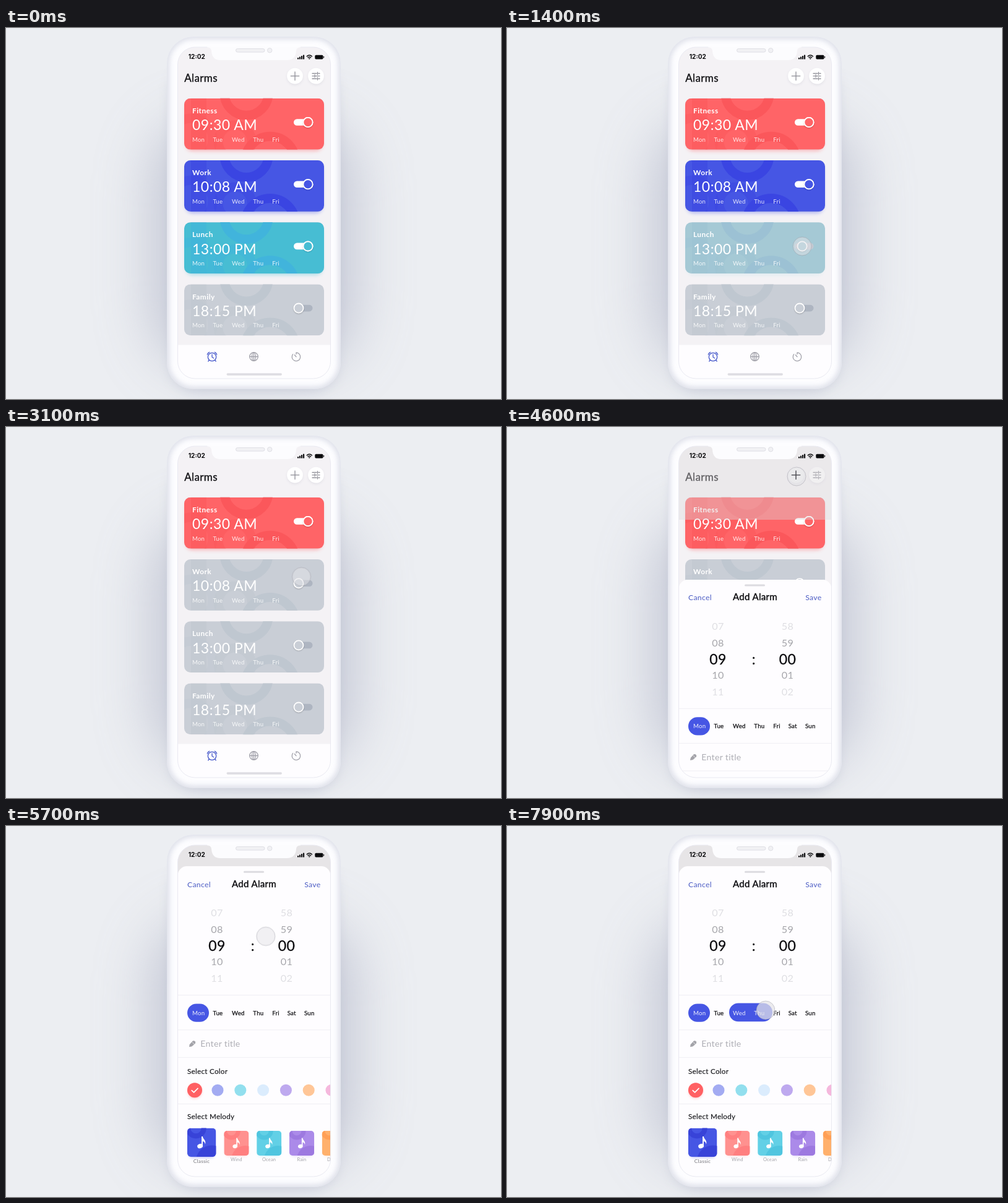
Animation of 800 by 600 pixels, one loop 8000 ms. Source, as an HTML page:

```html
<!DOCTYPE html>
<html lang="en">
<head>
<meta charset="utf-8">
<title>Alarms</title>
<style>
  html, body { margin: 0; width: 100%; height: 100%; overflow: hidden; background: #eceef2; }
  svg { display: block; }
  text { font-family: Lato, "Open Sans", sans-serif; letter-spacing: .022em; white-space: pre; }
  .clock { font-family: Inter, sans-serif; font-weight: 700; letter-spacing: 0; }

  /* --on: 1 = alarm lit, 0 = alarm off */
  @property --on { syntax: "<number>"; inherits: true; initial-value: 1; }
  .lit { opacity: var(--on); }
  .knob { transform: translateX(calc((var(--on) - 1) * 15px)); }
  .family { --on: 0; }

  .lunch, .work, .sheet, .dim, .cursor, .disc, .plus, .range, .rangeBox {
    animation: 8s linear infinite;
  }
  .lunch { animation-name: lunch; }
  .work { animation-name: work; }
  .sheet { animation-name: sheet; }
  .dim { animation-name: dim; }
  .cursor { animation-name: cursor; }
  .disc { animation-name: press; }
  .plus { animation-name: plus; }
  .range { animation-name: range; }
  .rangeBox { animation-name: stretch; }

  @keyframes lunch {
    0%, 13.125% { --on: 1; animation-timing-function: ease-in-out; }
    20%, 100% { --on: 0; }
  }
  @keyframes work {
    0%, 29.375% { --on: 1; animation-timing-function: ease-in-out; }
    35.625%, 100% { --on: 0; }
  }
  @keyframes sheet {
    0%, 55.25% { transform: translateY(508px); }
    56.25% { transform: translateY(455px); }
    57.5% { transform: translateY(183px); }
    58.75% { transform: translateY(62px); }
    60% { transform: translateY(14px); }
    61.25% { transform: translateY(-3px); }
    62.5% { transform: translateY(-6px); animation-timing-function: ease-in-out; }
    67.5%, 100% { transform: none; }
  }
  @keyframes dim {
    0%, 56.25% { opacity: 0; }
    57.5% { opacity: .4; }
    60%, 100% { opacity: .55; }
  }
  @keyframes cursor {
    0%, 6% { opacity: 0; transform: translate(488px, 353px); }
    10%, 13.125% { opacity: 1; transform: translate(488px, 353px); animation-timing-function: ease-in-out; }
    20%, 21.5% { transform: translate(473px, 353px); animation-timing-function: ease-in-out; }
    27.5%, 29.375% { transform: translate(490px, 251px); animation-timing-function: ease-in-out; }
    35.625%, 37% { transform: translate(478px, 251px); animation-timing-function: ease-in-out; }
    48%, 65% { transform: translate(468px, 80px); animation-timing-function: ease-in; }
    71.25% { transform: translate(420px, 178px); animation-timing-function: ease-out; }
    78%, 90% { transform: translate(376px, 298px); animation-timing-function: cubic-bezier(.4, 0, .8, .8); }
    98.75%, 100% { opacity: 1; transform: translate(418px, 298px); }
  }
  @keyframes press {
    0%, 80% { fill-opacity: .5; }
    83%, 100% { fill-opacity: .72; }
  }
  @keyframes plus {
    0%, 51% { opacity: 0; }
    53%, 59.2% { opacity: 1; }
    59.3%, 100% { opacity: 0; }
  }
  @keyframes range {
    0%, 81.5% { opacity: 0; }
    84%, 100% { opacity: 1; }
  }
  @keyframes stretch {
    0%, 90% { width: 34px; animation-timing-function: cubic-bezier(.4, 0, .8, .8); }
    98.75%, 100% { width: 70px; }
  }
</style>
</head>
<body>
<svg id="stage" width="800" height="600" viewBox="0 0 800 600"></svg>
<script>
const BLUE = '#4656e4', GRAY = '#c9ced6', GRAY_RING = '#bfc7d0';

const text = (x, y, size, str, attrs = '') =>
  `<text x="${x}" y="${y}" font-size="${size}" ${attrs}>${str}</text>`;
const ink = (color, weight = .35) => `fill="${color}" stroke="${color}" stroke-width="${weight}"`;
const rect = (x, y, w, h, r, attrs = '') =>
  `<rect x="${x}" y="${y}" width="${w}" height="${h}" rx="${r}" ${attrs}/>`;
const circle = (x, y, r, attrs = '') => `<circle cx="${x}" cy="${y}" r="${r}" ${attrs}/>`;
const path = (d, attrs = '') => `<path d="${d}" ${attrs}/>`;
const line = color => `fill="none" stroke="${color}" stroke-width="1.3" stroke-linecap="round" stroke-linejoin="round"`;
const at = (x, y, body, attrs = '') => `<g transform="translate(${x} ${y})" ${attrs}>${body}</g>`;

// Alarm cards
const face = (base, ring, track) => `
  <g clip-path="url(#card)">
    ${rect(0, 0, 226, 83, 0, `fill="${base}"`)}
    <g fill="none" stroke="${ring}" stroke-width="15">
      ${rect(11, 0, 25, 83, 0, `fill="${ring}" stroke="none" opacity=".5"`)}
      ${circle(12, 66, 34, 'opacity=".45"')}
      ${circle(82, 70, 27, 'opacity=".5"')}
      ${circle(100.5, -8, 35.5)}
      ${circle(139, 102, 40.5)}
    </g>
  </g>
  ${rect(177, 33.4, 30.5, 10.6, 5.3, `fill="${track}"`)}`;

const DAYS = [['Mon', 301], ['Tue', 334.5], ['Wed', 365], ['Thu', 399.3], ['Fri', 430.3], ['Sat', 454.7], ['Sun', 482]];

const card = (name, row, title, time, base, ring) => at(288, 113.8 + 100.2 * row, `
  <g class="lit">${rect(3, 6, 220, 79, 10, `fill="${base}" opacity=".45" filter="url(#soft3)"`)}</g>
  ${face(GRAY, GRAY_RING, '#aeb5c1')}
  <g class="lit">${face(base, ring, '#fff')}</g>
  <g class="knob" stroke="#fff" stroke-width="1.8">
    ${circle(200, 39.8, 8.3, 'fill="#000" stroke="none" opacity=".22" filter="url(#soft1)"')}
    ${circle(200, 38.7, 7.6, `fill="${GRAY}"`)}
    ${circle(200, 38.7, 7.6, `class="lit" fill="${base}"`)}
  </g>
  <g fill="#fff">
    ${text(13, 24.3, 11.8, title, 'font-weight="700" style="letter-spacing:.04em"')}
    ${text(13, 51.4, 23, time)}
    <g opacity=".85">${DAYS.slice(0, 5).map(([d, x]) => text(x - 288, 70, 9.6, d)).join('')}</g>
  </g>`, `class="${name}"`).replace(/^<g (transform="[^"]*") class="([^"]*)">/, '<g $1><g class="$2">') + '</g>';

const plusIcon = color => path('M460.3 77.7H473.7M467 71V84.4', line(color));
const slidersIcon = path('M495 73.5H502M505 73.5H507M503.5 71.5V75.5M495 77.7H497.5M500 77.7H507M499 75.7V79.7M495 82H502M505 82H507M503.5 80V84', line('#92929a'));

const button = x => circle(x, 79.5, 12.5, 'fill="#777a90" opacity=".16" filter="url(#soft2)"') + circle(x, 77.7, 12.9, 'fill="#fff"');

const nav = `
  ${rect(277, 512.5, 248, 56, 0, 'fill="#fefdff"')}
  <g ${line('#4355c9')}>
    ${circle(333, 532, 6.7)}
    ${path('M333 528V532.3L335.8 534M325.3 528.2Q326 525.5 328.6 524.3M340.7 528.2Q340 525.5 337.4 524.3M328.3 537.3L326.8 539M337.7 537.3L339.2 539')}
  </g>
  <g ${line('#a3a3ab')}>
    ${circle(400.5, 531.5, 6.8)}
    <ellipse cx="400.5" cy="531.5" rx="3" ry="6.8"/>
    ${path('M394 531.5H407M400.5 525V538')}
    ${path('M469 527.5V525A6.8 6.8 0 1 1 463.6 527.6M466.4 528.7L469 531.7')}
  </g>
  ${rect(356.5, 558.3, 89.5, 3.6, 1.8, 'fill="#dfdee3"')}`;

// Add-alarm sheet
const wheel = (x, rows) => rows.map((n, i) => {
  const far = Math.abs(i - 2), y = [145.8, 172.8, 202.2, 225.2, 252.2][i];
  return text(x, y, far ? 16.2 : 23, n, `text-anchor="middle" ${far ? `fill="${far > 1 ? '#dfdfe3' : '#a6a6ab'}"` : ink('#0b0b0e', .3)}`);
}).join('');

const SWATCHES = ['#a3abf2', '#92dfee', '#dbecfd', '#bea9ef', '#ffc697', '#f5b8dd'];

const tile = (x, y, scale, base, ring) => at(x, y, `<g transform="scale(${scale})">
  ${rect(2, 5, 36, 36, 5, `fill="${base}" opacity=".35" filter="url(#soft2)"`)}
  <g clip-path="url(#tile)">
    ${rect(0, 0, 40, 40, 0, `fill="${base}"`)}
    ${circle(12, 0, 11, `fill="none" stroke="${ring}" stroke-width="7"`)}
    ${circle(34, 46, 22, `fill="${ring}"`)}
  </g>
  <g fill="#fff">
    <ellipse cx="17.8" cy="25" rx="3.9" ry="3.1" transform="rotate(-20 17.8 25)"/>
    ${path('M19.9 25V11.5H21.4C21.8 15.6 26.6 16.4 25 22.6C24.6 19.6 23 18.6 21.5 18.4V25Z')}
  </g></g>`);

const MELODIES = [['Wind', '#ff918f', '#ff7f80'], ['Ocean', '#62d0e6', '#4fc5df'], ['Rain', '#ab8ae9', '#9d79e0'], ['Desert', '#ffb06c', '#ff9f55']];

const week = attrs => DAYS.map(([d, x]) => text(x, 305.5, 9.7, d, attrs)).join('');

const sheet = `
  ${rect(277.5, 65, 247, 502, 15, 'fill="#fefdff"')}
  ${rect(384, 72.8, 33, 3, 1.5, 'fill="#dcdbe0"')}
  ${text(293, 98.7, 12.3, 'Cancel', 'fill="#4c5cc4"')}
  ${text(401, 98.7, 15, 'Add Alarm', `text-anchor="middle" ${ink('#0b0b0e', .4)}`)}
  ${text(508.5, 98.7, 12.3, 'Save', 'text-anchor="end" fill="#4c5cc4"')}
  ${wheel(341, ['07', '08', '09', '10', '11'])}
  ${text(399, 202.2, 23, ':', `text-anchor="middle" ${ink('#0b0b0e', .3)}`)}
  ${wheel(453.5, ['58', '59', '00', '01', '02'])}
  ${path('M278 273.5H524M278 329.8H524M278 374.3H524M278 449.5H524', 'stroke="#f0eff4"')}
  ${week(ink('#111114', .25))}
  ${rect(293, 287.5, 35, 29.3, 14.6, `fill="${BLUE}"`)}
  ${text(301, 305.5, 9.7, 'Mon', 'fill="#fff" opacity=".9"')}
  <g class="range"><g clip-path="url(#range)">
    ${rect(355, 280, 100, 40, 0, `fill="${BLUE}"`)}
    <g opacity=".9">${week('fill="#fff"')}</g>
  </g></g>
  ${path('M296 357.2L296.8 353.2L301.6 347.8Q303.6 346.6 305.4 348.2Q307 350 305.8 351.8L300.4 356.4Z', 'fill="#a3a3a9"')}
  ${path('M300.8 349.4L304.2 352.9', 'stroke="#fefdff" stroke-width=".8"')}
  ${text(314.3, 357, 14.1, 'Enter title', 'fill="#aeaeb5"')}
  ${text(293, 400.6, 11.7, 'Select Color', ink('#17171b', .15))}
  ${circle(305, 429.5, 11, 'fill="#ff6467" opacity=".35" filter="url(#soft2)"')}
  ${circle(305, 427.3, 12, 'fill="#ff6063"')}
  ${path('M300.2 427.6L303.6 430.8L310 424.4', 'fill="none" stroke="#fff" stroke-width="1.7" stroke-linecap="round" stroke-linejoin="round"')}
  ${SWATCHES.map((c, i) => circle(342 + 36.8 * i, 427.3, 9.5, `fill="${c}"`)).join('')}
  ${text(293, 473.6, 11.7, 'Select Melody', ink('#17171b', .15))}
  ${tile(293, 488.6, 1.16, BLUE, '#3843d8')}
  ${text(316, 545.4, 8.4, 'Classic', 'text-anchor="middle" fill="#76767c"')}
  ${MELODIES.map(([name, base, ring], i) => tile(352.4 + 52.8 * i, 493, 1, base, ring) +
    text(372.3 + 52.8 * i, 541.8, 7.5, name, 'text-anchor="middle" fill="#a2a2a8"')).join('')}`;

const status = `
  ${text(294.8, 50.4, 10, '12:02', 'class="clock" fill="#0b0b0d"')}
  ${[0, 1, 2, 3].map(i => rect(471 + 3 * i, 48 - 1.5 * i, 2.1, 2.5 + 1.5 * i, .5, 'fill="#0b0b0d"')).join('')}
  <g fill="none" stroke="#0b0b0d" stroke-width="1.5">
    ${path('M485.8 46.2Q490.3 41.8 494.8 46.2M487.6 48.2Q490.3 45.4 493 48.2')}
  </g>
  ${circle(490.3, 49.5, 1.1, 'fill="#0b0b0d"')}
  ${rect(499.3, 43.7, 13.2, 6.8, 1.7, 'fill="#0b0b0d"')}
  ${rect(513.1, 45.8, 1, 2.6, .5, 'fill="#0b0b0d"')}`;

const notch = `
  ${path('M325 30H476V31.3Q469.5 31.5 469 37Q468 52 454 52H346Q333 52 332 37Q331.500 31.500 325 31.300Z', 'fill="#fcfcfe"')}
  ${rect(371.5, 33.4, 46.500, 5.600, 2.800, 'fill="#f1f1f4" stroke="#dfdfe5"')}
  ${circle(426.200, 36.200, 3.700, 'fill="#f1f1f4" stroke="#dfdfe5"')}`;

const blur = (id, dev) => `<filter id="${id}" x="-60%" y="-60%" width="220%" height="220%"><feGaussianBlur stdDeviation="${dev}"/></filter>`;
const clip = (id, shape) => `<clipPath id="${id}">${shape}</clipPath>`;

document.getElementById('stage').innerHTML = `
  <defs>
    ${blur('soft1', 1)}${blur('soft2', 2)}${blur('soft3', 3)}${blur('soft5', 4)}${blur('soft12', 10)}${blur('soft45', 45)}
    ${clip('card', rect(0, 0, 226, 82.8, 10))}
    ${clip('tile', rect(0, 0, 40, 40, 5))}
    ${clip('screen', rect(277.5, 31, 247, 536, 28))}
    ${clip('body', rect(260, 14, 281, 570, 43))}
    ${clip('range', rect(359, 286.5, 34, 29.8, 14.9, 'class="rangeBox"'))}
  </defs>
  ${rect(0, 0, 800, 600, 0, 'fill="#eceef2"')}
  ${rect(235, 150, 330, 400, 90, 'fill="#b6bacb" opacity=".75" filter="url(#soft45)"')}
  ${rect(266, 60, 269, 528, 42, 'fill="#aeb2c4" opacity=".45" filter="url(#soft12)"')}
  ${rect(260, 14, 281, 570, 43, 'fill="#fdfdff"')}
  <g clip-path="url(#body)">
    ${rect(259, 13, 283, 572, 44, 'fill="none" stroke="#cdd0de" stroke-width="9" opacity=".75" filter="url(#soft5)"')}
  </g>
  <g clip-path="url(#screen)">
    ${rect(277, 30, 248, 538, 0, 'fill="#f4f2f5"')}
    ${text(288.200, 86.500, 17, 'Alarms', ink('#141417', .4))}
    ${button(467)}${button(501)}
    ${plusIcon('#8f8f97')}${slidersIcon}
    ${card('fitness', 0, 'Fitness', '09:30 AM', '#ff6467', '#fb575b')}
    ${card('work', 1, 'Work', '10:08 AM', BLUE, '#3a45e2')}
    ${card('lunch', 2, 'Lunch', '13:00 PM', '#47bdd3', '#41b4dc')}
    ${card('family', 3, 'Family', '18:15 PM', GRAY, GRAY_RING)}
    ${nav}
    ${rect(277, 30, 248, 120, 0, 'class="dim" fill="#dcdadc"')}
    <g class="sheet">${sheet}</g>
    ${status}
  </g>
  ${rect(277.500, 31, 247, 536, 28, 'fill="none" stroke="#e9e9f1"')}
  ${notch}
  <g class="cursor">
    ${circle(0, 0, 15, 'class="disc" fill="#e4e3e8" stroke="#8c8c96" stroke-opacity=".4"')}
  </g>
  <g class="plus">${plusIcon('#45454b')}</g>`;
</script>
</body>
</html>
```
